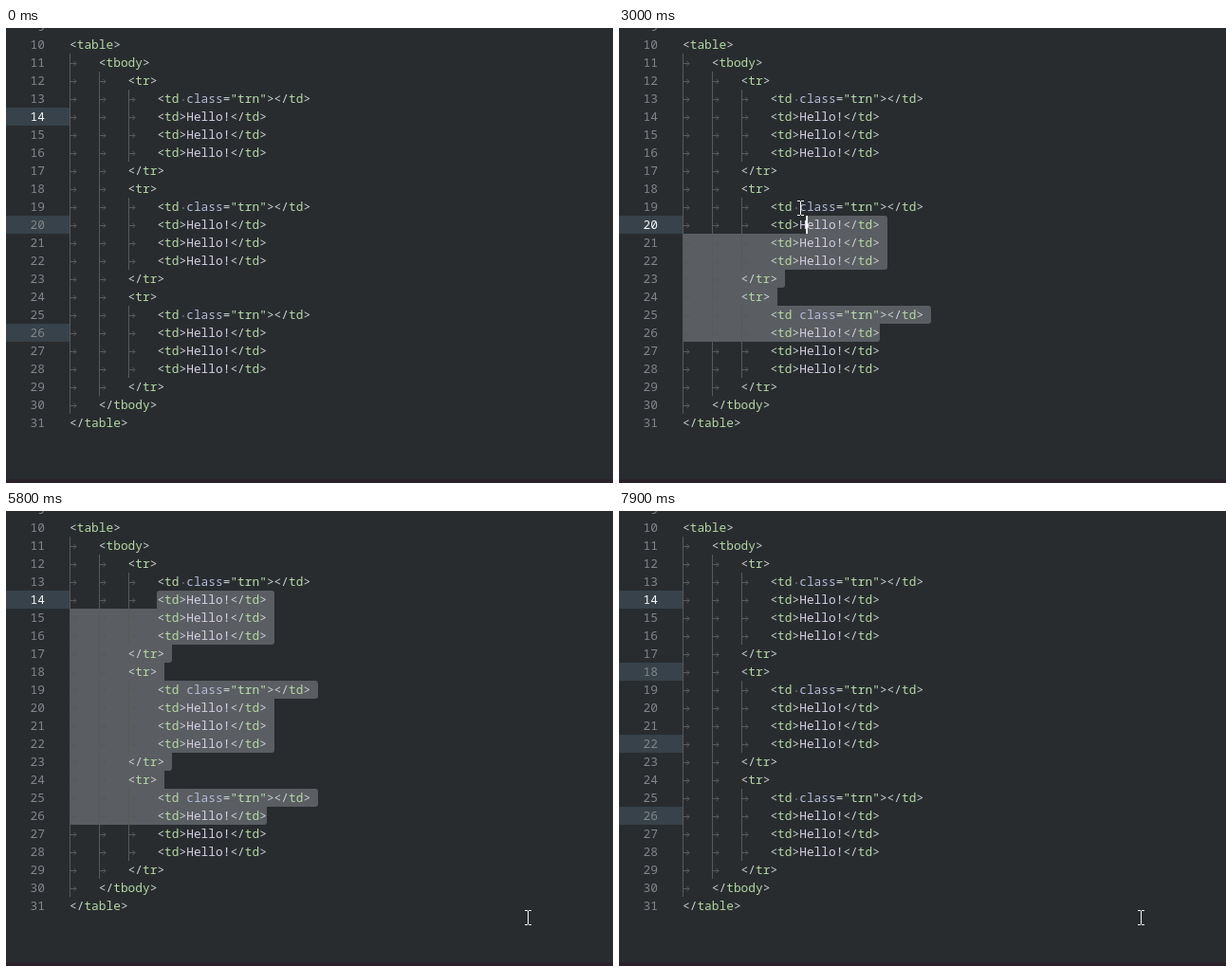
Recreate the animation shown at these times as an HTML page with a canvas. Size 640 by 480 pixels, loop 8 s.

```html
<!DOCTYPE html>
<html lang="en">
<head>
<meta charset="utf-8">
<style>
  html, body { margin: 0; width: 100%; height: 100%; overflow: hidden; background: #292c2f; }
  canvas { display: block; }
</style>
</head>
<body>
<canvas id="stage" width="640" height="480"></canvas>
<script>
const ctx = document.getElementById('stage').getContext('2d');
const LOOP = 8000, BLINK = 460, FIRST = 10, LAST_SELECTED = 26;
const ROW = 19, MARGIN = 8, LEFT = 67, CHAR = 7.7, TAB = 4;
const CLICK = 1940, DRAG = 2440, DROP = 3480, SPLITS = [6100, 6500, 7000, 7400];
const WHITE = '#f8f8f8', BRACKET = '#cbd3d2', TAG = '#b4d8a6', ATTR = '#b3bbdb',
      STRING = '#b8dfb1', TEXT = '#d5cfe5', INVISIBLE = '#585b59';

// Each line: [indent depth, text]
const cell = [3, '<td>Hello!</td>'];
const tableRow = [[2, '<tr>'], [3, '<td class="trn"></td>'], cell, cell, cell, [2, '</tr>']];
const lines = [[0, '<table>'], [1, '<tbody>'], ...tableRow, ...tableRow, ...tableRow,
               [1, '</tbody>'], [0, '</table>']];

// Key points of the pointer: time, left, top
const pointerPath = [
  [500, 45, 33], [1100, 288, 329], [1200, 283, 318], [2400, 283, 318], [3000, 188, 182],
  [3040, 175, 146], [3200, 175, 146], [3500, 153, 81], [4300, 153, 80],
  [4800, 557, 441], [4900, 557, 441], [5100, 547, 421], [LOOP, 547, 421]
];

const rowTop = n => MARGIN + (n - FIRST) * ROW;
const colX = col => Math.round(LEFT + col * CHAR);
const startCol = n => lines[n - FIRST][0] * TAB;
const endCol = n => startCol(n) + lines[n - FIRST][1].length;

function fill(color, x, y, w, h) {
  ctx.fillStyle = color;
  ctx.fillRect(x, y, w, h);
}

function pointerAt(t) {
  const i = pointerPath.findIndex(key => key[0] > t);
  const [t0, x0, y0] = pointerPath[i - 1], [t1, x1, y1] = pointerPath[i];
  const k = (t - t0) / (t1 - t0);
  return [Math.round(x0 + (x1 - x0) * k), Math.round(y0 + (y1 - y0) * k)];
}

// The dragged caret follows the middle of the pointer with a short lag
function dragCaret(t) {
  const [x, y] = pointerAt(Math.min(t, 3500) - 60);
  const n = FIRST + Math.floor((y + 8 - MARGIN) / ROW);
  const col = Math.round((x + 3 - LEFT) / CHAR);
  return [n, Math.max(startCol(n), Math.min(endCol(n), col))];
}

// One caret on every step-th line
function caretsEvery(step, colOf) {
  const carets = [];
  for (let n = 14; n <= LAST_SELECTED; n += step) carets.push([n, colOf(n)]);
  return carets;
}

// Carets as [line, column]; blinking restarts at "since"
function editorAt(t) {
  if (t < CLICK) return { since: -500, carets: caretsEvery(6, () => 22) };
  if (t < DRAG) return { since: CLICK, carets: [[LAST_SELECTED, endCol(LAST_SELECTED)]] };
  if (t < SPLITS[0]) return { since: Math.min(t, DROP), carets: [dragCaret(t)], selecting: true };
  const done = SPLITS.filter(time => time <= t);
  return { since: done.at(-1), carets: caretsEvery(done.length, endCol) };
}

function drawSelection([line, col]) {
  const last = LAST_SELECTED;
  const right = n => n < line || n > last ? 0 : colX(endCol(n) + (n < last ? 1 : 0));
  ctx.fillStyle = '#5a5d61';
  for (let n = line; n <= last; n++) {
    const left = n === line ? colX(col) : LEFT;
    const topRight = right(n - 1) < right(n) ? 3 : 0;
    const bottomRight = right(n + 1) < right(n) ? 3 : 0;
    ctx.beginPath();
    ctx.roundRect(left, rowTop(n), right(n) - left, ROW,
                  [n === line ? 3 : 0, topRight, bottomRight, n === last ? 3 : 0]);
    ctx.fill();
  }
}

function drawIndent(depth, y) {
  ctx.strokeStyle = INVISIBLE;
  for (let d = 0; d < depth; d++) {
    const x = colX(d * TAB);
    fill(INVISIBLE, x, y, 1, ROW);
    ctx.beginPath();
    ctx.moveTo(x + 1, y + 10.5);
    ctx.lineTo(x + 7, y + 10.5);
    ctx.moveTo(x + 4.5, y + 8);
    ctx.lineTo(x + 7, y + 10.5);
    ctx.lineTo(x + 4.5, y + 13);
    ctx.stroke();
  }
}

function tokenColor(token, previous) {
  if (/[<>=]/.test(token)) return BRACKET;
  if (token[0] === '"') return STRING;
  if (token === 'class') return ATTR;
  return previous[0] === '<' ? TAG : TEXT;
}

function drawLine([depth, text], y) {
  drawIndent(depth, y);
  let col = depth * TAB, previous = '';
  for (const token of text.match(/<\/?|>|=|"\w+"|[\w!]+| /g)) {
    if (token === ' ') {
      fill(INVISIBLE, colX(col) + 3, y + 10, 2, 2);
    } else {
      ctx.fillStyle = tokenColor(token, previous);
      ctx.fillText(token, LEFT + col * CHAR, y + 14);
    }
    col += token.length;
    previous = token;
  }
}

function drawPointer(t) {
  if (t < pointerPath[0][0]) return;
  const [x, y] = pointerAt(t);
  for (const serif of [y, y + 15]) {
    fill(WHITE, x, serif, 3, 1);
    fill(WHITE, x + 4, serif, 3, 1);
  }
  fill(WHITE, x + 3, y + 1, 1, 14);
}

function draw(t) {
  const { since, carets, selecting } = editorAt(t);
  fill('#292c2f', 0, 0, 640, 480);
  fill('#2a222b', 0, 476, 640, 4);
  for (const [n] of carets) fill('#37424a', 0, rowTop(n), LEFT, ROW);
  if (selecting) drawSelection(carets[0]);

  ctx.font = '12.83px "Noto Sans Mono", monospace';
  ctx.textAlign = 'left';
  lines.forEach((line, i) => drawLine(line, rowTop(FIRST + i)));
  ctx.textAlign = 'right';
  for (let n = FIRST - 1; n < FIRST + lines.length; n++) {
    ctx.fillStyle = n === carets[0][0] ? WHITE : '#81868a';
    ctx.fillText(n, 41, rowTop(n) + 14);
  }

  if (Math.floor((t - since) / BLINK) % 2 === 0) {
    for (const [n, col] of carets) fill(WHITE, colX(col) - 1, rowTop(n), 2, ROW);
  }
  drawPointer(t);
}

function tick() {
  // The screen is sampled ten times a second
  draw(Math.floor(performance.now() % LOOP / 100) * 100);
  requestAnimationFrame(tick);
}
tick();
</script>
</body>
</html>
```
